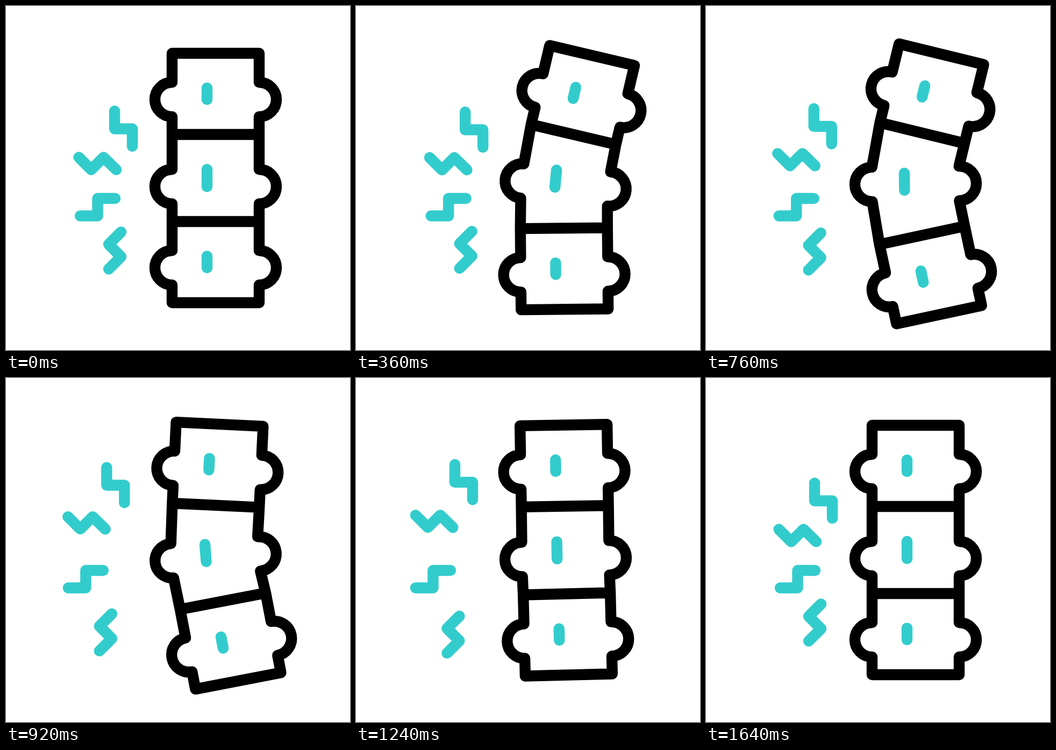
Recreate the animation shown at these times as an HTML page with a canvas. Size 640 px wide and 640 px high, loop 1680 ms.

```html
<!DOCTYPE html>
<html lang="en">
<head>
<meta charset="utf-8">
<title>Bending spine</title>
<style>
  html, body { margin: 0; width: 100%; height: 100%; overflow: hidden; background: #fff; }
  canvas { display: block; width: 100vmin; height: 100vmin; }
</style>
</head>
<body>
<canvas id="stage" width="640" height="640"></canvas>
<script>
const ctx = document.getElementById('stage').getContext('2d');
const LOOP = 1680, STEP = 40, HALF = 81, BUMP = 32, TOP = -86, BASE = 65;
const TEAL = '#33cccc';

// Timelines as [time, value], eased between keys
const topBend = [[90, 0], [565, 1], [1050, -0.065], [1530, 0]];
const lowBend = [[455, 0], [805, 1], [1360, 0]];
const nearKeys = [[285, 0], [580, 1], [1100, 0]];
const farKeys = [[580, 0], [1100, 1], [1570, 0]];

// Each bolt: points, shift towards the spine, shift away from it
const bolts = [
  { points: [[202, 195.5], [202, 228.5], [235, 228.5], [235, 261]], near: [7, 10.5], far: [-23, -44] },
  { points: [[135.5, 281.5], [158.5, 304.5], [181.5, 281.5], [205, 304.5]], near: [9, 3], far: [-31.5, -33.5] },
  { points: [[138, 390.5], [170.5, 390.5], [170.5, 358], [203, 358]], near: [10, 0], far: [-34.5, 0] },
  { points: [[214, 420.5], [191, 443.5], [214, 466.5], [191, 489.5]], near: [10, -8.5], far: [-27.5, 28.5] },
];

function ease(keys, t) {
  if (t <= keys[0][0]) return keys[0][1];
  for (let i = 1; i < keys.length; i++) {
    const [t0, v0] = keys[i - 1], [t1, v1] = keys[i];
    if (t < t1) {
      const u = (t - t0) / (t1 - t0);
      return v0 + (v1 - v0) * u * u * (3 - 2 * u);
    }
  }
  return keys[keys.length - 1][1];
}

function place([x, y, degrees]) {
  ctx.setTransform(1, 0, 0, 1, x, y);
  ctx.rotate(degrees * Math.PI / 180);
}

function stroke(color) {
  ctx.resetTransform();
  ctx.strokeStyle = color;
  ctx.stroke();
}

function rightBump() { ctx.arc(HALF, 0, BUMP, -Math.PI / 2, Math.PI / 2); }
function leftBump() { ctx.arc(-HALF, 0, BUMP, Math.PI / 2, Math.PI * 1.5); }

function drawSpine(upper, middle, lower) {
  ctx.beginPath();
  place(upper);
  ctx.moveTo(-HALF, TOP);
  ctx.lineTo(HALF, TOP);
  rightBump();
  ctx.lineTo(HALF, BASE);
  place(middle);
  rightBump();
  place(lower);
  ctx.lineTo(HALF, TOP);
  rightBump();
  ctx.lineTo(HALF, BASE);
  ctx.lineTo(-HALF, BASE);
  leftBump();
  ctx.lineTo(-HALF, TOP);
  place(middle);
  leftBump();
  place(upper);
  ctx.lineTo(-HALF, BASE);
  leftBump();
  ctx.closePath();

  ctx.moveTo(-HALF, BASE);
  ctx.lineTo(HALF, BASE);
  place(lower);
  ctx.moveTo(-HALF, TOP);
  ctx.lineTo(HALF, TOP);
  stroke('#000');
}

function drawPill(pose, x, from, to) {
  ctx.beginPath();
  place(pose);
  ctx.moveTo(x, from);
  ctx.lineTo(x, to);
  stroke(TEAL);
}

function drawBolt({ points, near, far }, n, f) {
  ctx.beginPath();
  for (const [x, y] of points) {
    ctx.lineTo(x + near[0] * n + far[0] * f, y + near[1] * n + far[1] * f);
  }
  stroke(TEAL);
}

function draw(t) {
  const a = ease(topBend, t), b = ease(lowBend, t);
  const tilt = 8.7 * a - 6.3 * b;
  const upper = [390 + 49 * a - 3 * b, 174 + 3 * a - 2.8 * b, 22 * a];
  const middle = [390, 336 - 5 * a - 2 * b, tilt];
  const lower = [390 - 4 * a + 34 * b, 487 + 20.5 * a + 11.5 * b, -0.9 * a - 12.1 * b];
  const middlePill = [374 - 4 * a - 2.5 * b, 320 + 2 * a + 6 * b, tilt];

  ctx.resetTransform();
  ctx.fillStyle = '#fff';
  ctx.fillRect(0, 0, 640, 640);
  ctx.lineWidth = 20.4;
  ctx.lineCap = ctx.lineJoin = 'round';

  drawSpine(upper, middle, lower);
  drawPill(upper, -16, -21.5, 0);
  drawPill(middlePill, 0, -16, 16);
  drawPill(lower, -16, -21.5, 0);
  const n = ease(nearKeys, t), f = ease(farKeys, t);
  for (const bolt of bolts) drawBolt(bolt, n, f);
}

function tick() {
  draw(Math.floor(performance.now() % LOOP / STEP) * STEP);
  requestAnimationFrame(tick);
}
tick();
</script>
</body>
</html>
```
